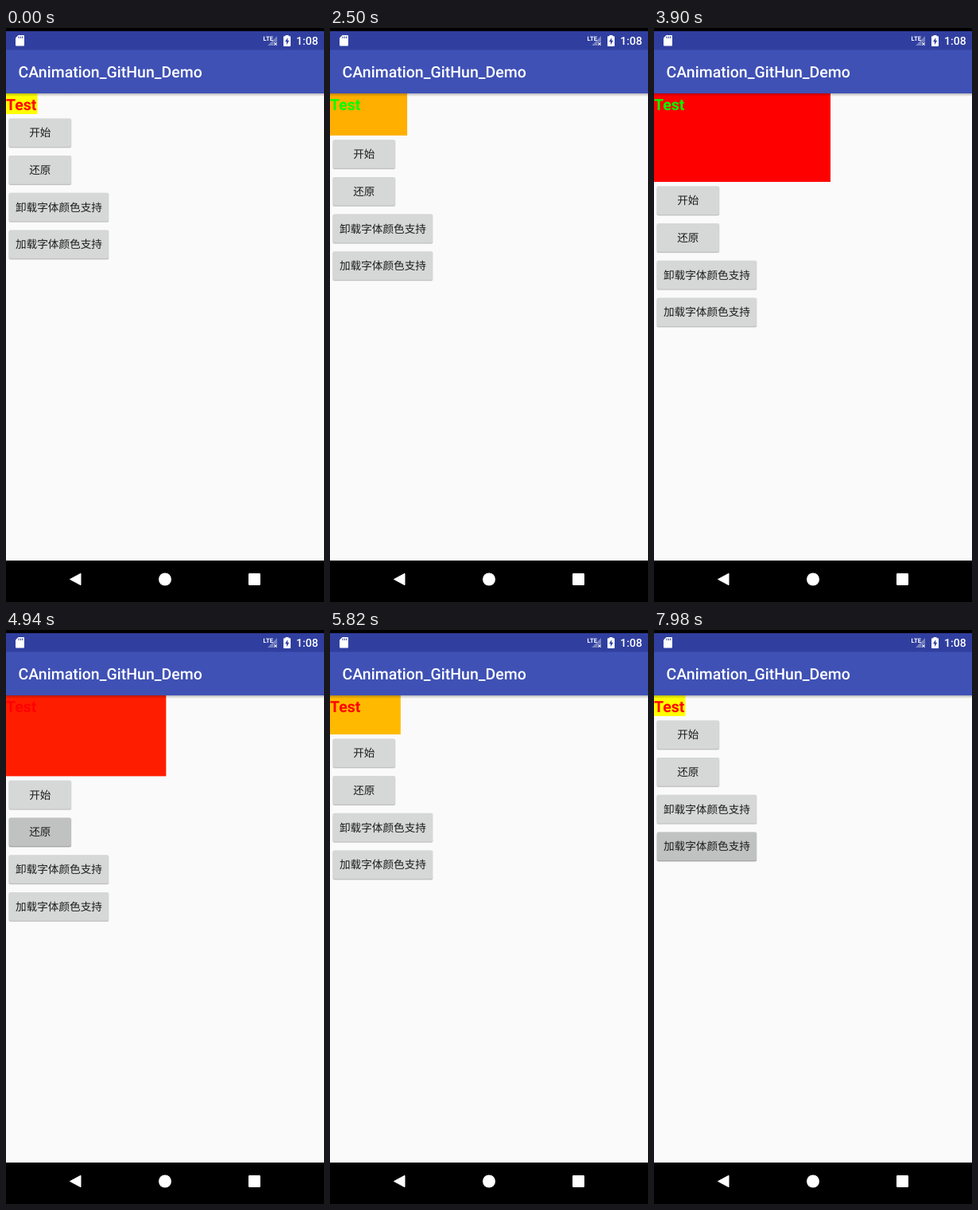
An HTML page that plays this animation: 400 by 720 pixels, repeating every 8 s.

```html
<!DOCTYPE html>
<html lang="zh-CN">
<head>
<meta charset="utf-8">
<title>Animation demo</title>
<style>
  html, body { margin: 0; width: 100%; height: 100%; overflow: hidden; background: #000; }
  svg { display: block; width: 400px; height: 720px; }
  text { font-family: Roboto, "Noto Sans", sans-serif; text-rendering: geometricPrecision; }
  .caption { font: 13.63px "Noto Sans CJK SC", "Noto Sans CJK", sans-serif; text-anchor: middle; fill: #1c1c1c; }
</style>
</head>
<body>
<svg viewBox="0 0 400 720">
  <defs>
    <linearGradient id="fade" x2="0" y2="1">
      <stop offset="0" stop-color="#000" stop-opacity=".26"/>
      <stop offset="1" stop-color="#000" stop-opacity="0"/>
    </linearGradient>
  </defs>
  <rect width="400" height="720"/>
  <rect y="82" width="400" height="586" fill="#fafafa"/>

  <rect id="box" y="82"/>
  <text id="label" y="102.6" font-size="19.47" font-weight="700">Test</text>
  <g id="buttons"></g>

  <rect y="82" width="400" height="4" fill="url(#fade)"/>
  <rect y="4" width="400" height="24" fill="#303f9f"/>
  <rect y="27.5" width="400" height="54.5" fill="#3f51b5"/>
  <text x="15.6" y="62.2" font-size="19.5" font-weight="500" fill="#fff">CAnimation_GitHun_Demo</text>

  <g fill="#fff">
    <path d="M15.5 9H22q1 0 1 1V21.5q0 1-1 1H13q-1 0-1-1V12.5Z"/>
    <path d="M16 10.5v2.5M18.3 10.5v2.5M20.6 10.5v2.5" stroke="#303f9f"/>
    <path d="M341 10V17.5H336.5V22H329Z" opacity=".35"/>
    <path d="M337.3 18.3l3.4 3.4m0-3.4l-3.4 3.4" stroke="#fff" stroke-width="1.1"/>
    <text x="323.6" y="15.6" font-size="7.6" font-weight="700">LTE</text>
    <path d="M351.5 9H355.5V10.3H357.2Q358 10.3 358 11.1V22.2Q358 23 357.2 23H349.8Q349 23 349 22.2V11.1Q349 10.3 349.8 10.3H351.5Z"/>
    <path d="M354.3 12L351 17.3H353V21L356.2 15.7H354.3Z" fill="#303f9f"/>
    <text x="365" y="21" font-size="14" font-weight="500">1:08</text>
    <path d="M80.5 691.5L94 684.3V698.7Z" stroke="#fff" stroke-linejoin="round"/>
    <circle cx="200" cy="691.5" r="8"/>
    <rect x="305" y="684" width="15" height="15" rx="1.2"/>
  </g>
</svg>
<script>
const LOOP = 8000;
const GROW = { start: 1870, length: 2000 };
const SHRINK = { start: 4727, length: 2020, settle: 6695 };
const PRESSES = [[2, 500], [0, 1700], [1, 4580], [3, 7620]];
const CAPTIONS = ["开始", "还原", "卸载字体颜色支持", "加载字体颜色支持"];
const box = document.getElementById("box");
const label = document.getElementById("label");
const group = document.getElementById("buttons");

const clamp = v => Math.min(1, Math.max(0, v));
const mix = (a, b, p) => a + (b - a) * p;

function add(parent, tag, attrs) {
  const el = document.createElementNS("http://www.w3.org/2000/svg", tag);
  for (const name in attrs) el.setAttribute(name, attrs[name]);
  return parent.appendChild(el);
}

const buttons = CAPTIONS.map((caption, i) => {
  const y = 113.4 + 46.7 * i;
  const width = caption.length > 2 ? 125.2 : 78;
  const shape = { x: 3.8, y, width, height: 35.6, rx: 2 };
  add(group, "rect", { ...shape, x: 3, width: width + 1.6, height: 37.2, fill: "#000", opacity: .08 });
  const shadow = add(group, "rect", { ...shape, y: y + 1.2 });
  add(group, "rect", { ...shape, fill: "#d6d7d7" });
  const clip = add(group, "clipPath", { id: "clip" + i });
  add(clip, "rect", shape);
  const ripple = add(group, "circle", {
    cx: 3.8 + width / 2, cy: y + 17.8, "clip-path": `url(#clip${i})`
  });
  add(group, "text", { class: "caption", x: 3.8 + width / 2, y: y + 22.9 }).textContent = caption;
  return { width, shadow, ripple };
});

// Falls to 1, then rebounds in three ever smaller arcs.
function bounce(u) {
  const t = u * 1.1226;
  if (t < .3535) return 8 * t * t;
  if (t < .7408) return 8 * (t - .54719) ** 2 + .7;
  if (t < .9644) return 8 * (t - .8526) ** 2 + .9;
  return 8 * (t - 1.0435) ** 2 + .95;
}

function growth(t) {
  if (t < SHRINK.start) return clamp((t - GROW.start) / GROW.length);
  if (t >= SHRINK.settle) return 0;
  return clamp(1 - bounce((t - SHRINK.start) / SHRINK.length));
}

function drawPress(index, age) {
  const { width, shadow, ripple } = buttons[index];
  const active = age >= 0 && age < 760;
  const strength = active ? clamp(age / 80) * clamp((760 - age) / 310) : 0;
  const spread = 1 - (1 - clamp(age / 240)) ** 2;
  ripple.setAttribute("r", mix(14, width / 2 + 14, spread));
  ripple.setAttribute("opacity", .1 * strength);
  shadow.setAttribute("opacity", mix(.16, .28, strength));
}

function draw(t) {
  const p = growth(t);
  box.setAttribute("width", mix(39.5, 222, p));
  box.setAttribute("height", mix(26, 111, p));
  box.setAttribute("fill", `rgb(255,${Math.round(255 * (1 - p))},0)`);
  label.setAttribute("fill", t >= GROW.start && t < SHRINK.start ? "#0f0" : "#f00");
  group.setAttribute("transform", `translate(0 ${85 * p})`);
  for (const [index, start] of PRESSES) drawPress(index, t - start);
}

const origin = performance.now();
function tick() {
  draw((performance.now() - origin) % LOOP);
  requestAnimationFrame(tick);
}
draw(0);
requestAnimationFrame(tick);
</script>
</body>
</html>
```
